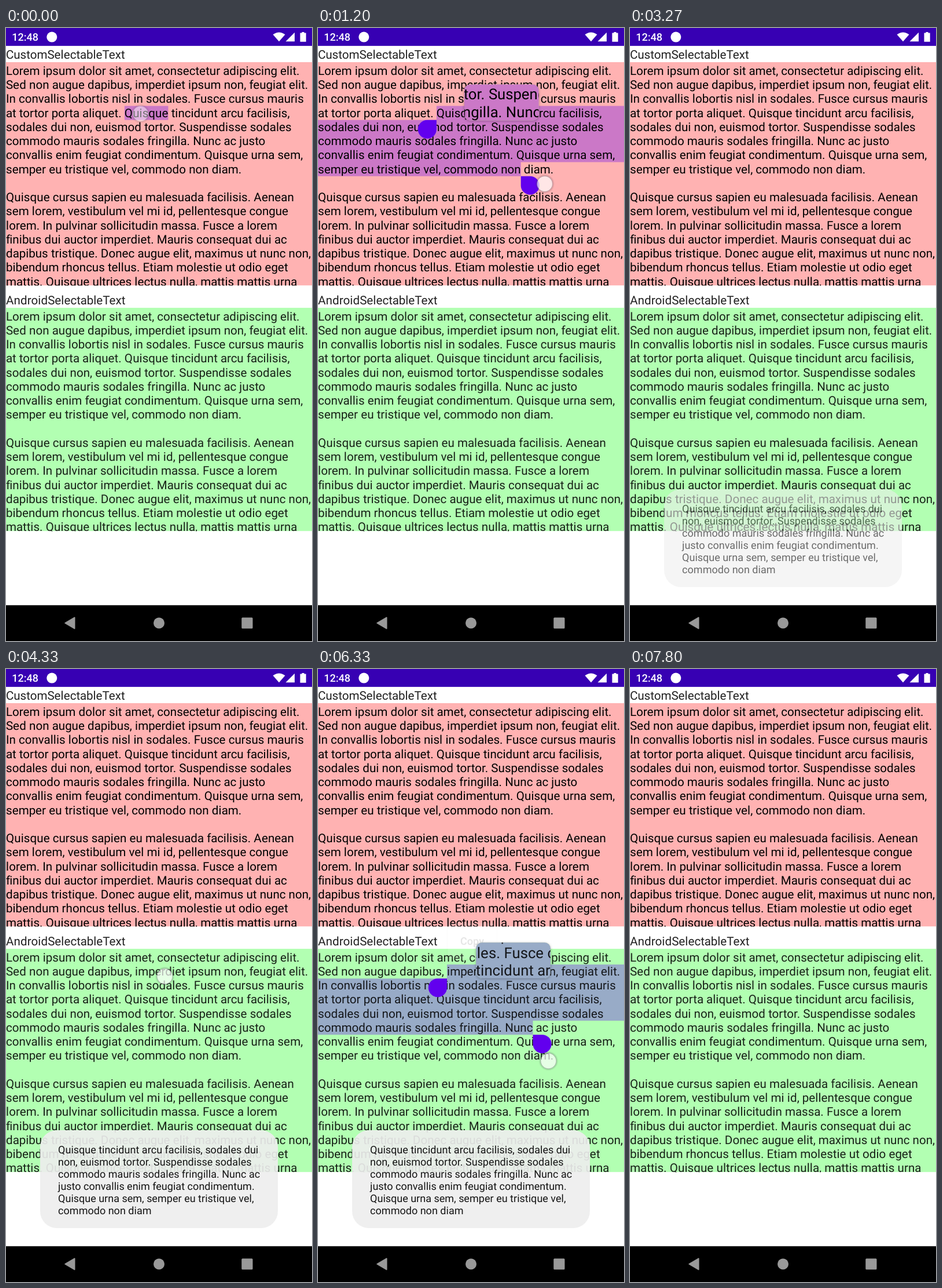
Write an HTML page that moves like this. It is 529 px wide and 1058 px high and loops after 8.67 s.

```html
<!DOCTYPE html>
<html lang="en">
<head>
<meta charset="utf-8">
<title>Selectable text</title>
<style>
  html, body { margin: 0; width: 100%; height: 100%; overflow: hidden; background: #fff; }
  svg { display: block; width: 100vw; height: 100vh; font: 20.572px Roboto, sans-serif; }
  text { white-space: pre; text-rendering: geometricPrecision; }
  .small { font-size: 18px; }
  .medium { font-weight: 500; }
  .middle { text-anchor: middle; }
  .lift { filter: drop-shadow(0 1px 2px rgba(0, 0, 0, .28)); }
</style>
</head>
<body>
<svg id="stage" viewBox="0 0 529 1058">
  <defs>
    <clipPath id="lens"><rect x="-64.3" y="-30.9" width="128.6" height="61.8" rx="10"/></clipPath>
    <path id="drop" d="M0 0V16.07A16.07 16.07 0 1 1 -16.07 0Z" fill="#6200ee"/>
  </defs>

  <g id="page"><rect width="529" height="1058" fill="#fff"/></g>

  <rect width="529" height="30.86" fill="#3700b3"/>
  <g fill="#fff">
    <text class="small medium" x="10.3" y="22.4">12:48</text>
    <circle cx="79.3" cy="15.6" r="9"/>
    <path d="M472 23.3L461.5 11.2Q472 3.6 482.5 11.2Z"/>
    <path d="M483.5 23.3H499V7.8Z"/>
    <path d="M511.5 7h4v1.6h3.2v15.2h-10.2v-15.2h3z"/>
  </g>
  <rect y="996.25" width="529" height="61.75" fill="#000"/>
  <g fill="#999">
    <path d="M102.3 1027L118.5 1017.6V1036.4Z" stroke="#999" stroke-width="2" stroke-linejoin="round"/>
    <circle cx="264.5" cy="1027" r="9.5"/>
    <rect x="407.3" y="1017.4" width="19.2" height="19.2" rx="1.5"/>
  </g>

  <use id="startHandle" href="#drop"/>
  <use id="endHandle" href="#drop"/>

  <g id="bar" class="lift">
    <rect height="62" rx="8" y="-31" fill="#fff"/>
    <text class="small medium middle" x="0" y="6.8"></text>
  </g>

  <g id="magnifier" class="lift">
    <g clip-path="url(#lens)"><use id="zoomed" href="#page"/></g>
    <rect x="-64.3" y="-30.9" width="128.6" height="61.8" rx="10" fill="none" stroke="#000" stroke-opacity=".08"/>
  </g>

  <g id="toast">
    <rect x="59" y="796" width="411" height="169" rx="29" fill="#eee" fill-opacity=".91"/>
    <g id="toastText" class="small" fill="#141414"></g>
  </g>

  <g id="dot">
    <circle r="15" fill="none" stroke="#403848" stroke-opacity=".12" stroke-width="2.5"/>
    <circle r="13.5" fill="#fff" fill-opacity=".68" stroke="#605868" stroke-opacity=".32" stroke-width="1.4"/>
  </g>
</svg>

<script>
const LOOP = 8670, STEP = 1000 / 15, WIDTH = 529;
// The phone lays out on a 1440 pixel wide screen; sizes in device pixels times PX.
const PX = WIDTH / 1440, BODY = 56, SMALL = 49;
const LINE = 66 * PX, ASCENT = 52 * PX, PANEL_TOP = 160 * PX, PANEL_HEIGHT = 1050 * PX;
const FIRST_TOP = 168 * PX, LABEL_BASE = 144 * PX;
const ZOOM = 1.25, SELECT_LAG = 60, LENS_LAG = 190, FADE = 220;

const LINES = `Lorem ipsum dolor sit amet, consectetur adipiscing elit.
Sed non augue dapibus, imperdiet ipsum non, feugiat elit.
In convallis lobortis nisl in sodales. Fusce cursus mauris
at tortor porta aliquet. Quisque tincidunt arcu facilisis,
sodales dui non, euismod tortor. Suspendisse sodales
commodo mauris sodales fringilla. Nunc ac justo
convallis enim feugiat condimentum. Quisque urna sem,
semper eu tristique vel, commodo non diam.

Quisque cursus sapien eu malesuada facilisis. Aenean
sem lorem, vestibulum vel mi id, pellentesque congue
lorem. In pulvinar sollicitudin massa. Fusce a lorem
finibus dui auctor imperdiet. Mauris consequat dui ac
dapibus tristique. Donec augue elit, maximus ut nunc non,
bibendum rhoncus tellus. Etiam molestie ut odio eget
mattis. Quisque ultrices lectus nulla, mattis mattis urna`.split('\n');

const TOAST = `Quisque tincidunt arcu facilisis, sodales dui
non, euismod tortor. Suspendisse sodales
commodo mauris sodales fringilla. Nunc ac
justo convallis enim feugiat condimentum.
Quisque urna sem, semper eu tristique vel,
commodo non diam`.split('\n');

const $ = id => document.getElementById(id);

function add(parent, tag, attrs = {}, text = '') {
  const node = document.createElementNS('http://www.w3.org/2000/svg', tag);
  for (const key in attrs) node.setAttribute(key, attrs[key]);
  node.textContent = text;
  return parent.appendChild(node);
}

const pen = document.createElement('canvas').getContext('2d');
pen.textRendering = 'geometricPrecision';
const measure = s => pen.measureText(s).width;

// Pen positions with glyph advances rounded to whole device pixels, plus kerning.
function penPositions(text, size) {
  pen.font = `${size}px Roboto, sans-serif`;
  let x = 0;
  return [...text].map((c, i) => {
    const last = text[i - 1];
    if (last) x += Math.round(measure(last)) + measure(last + c) - measure(last) - measure(c);
    return x * PX;
  });
}

function addText(parent, text, x, y, size, attrs) {
  const xs = penPositions(text, size).map(p => (x + p).toFixed(3)).join(' ');
  return add(parent, 'text', { x: xs, y, ...attrs }, text);
}

function addPanel(y, back, ink) {
  const panel = add($('page'), 'g', { transform: `translate(0 ${y})` });
  addText(panel, ink.label, 0, LABEL_BASE, BODY, { 'fill-opacity': .87 });
  const box = add(panel, 'svg', {
    y: PANEL_TOP, width: WIDTH, height: PANEL_HEIGHT, viewBox: `0 ${PANEL_TOP} ${WIDTH} ${PANEL_HEIGHT}`
  });
  add(box, 'rect', { y: PANEL_TOP, width: WIDTH, height: PANEL_HEIGHT, fill: back });
  const selection = add(box, 'path', { fill: '#6200ee', 'fill-opacity': .33 });
  const rows = LINES.map((line, i) =>
    addText(box, line, 0, FIRST_TOP + ASCENT + i * LINE, BODY, { 'fill-opacity': ink.alpha }));
  return { y, selection, rows };
}

const panels = [
  addPanel(0, '#ffb2b2', { label: 'CustomSelectableText', alpha: 1 }),
  addPanel(1154 * PX, '#b2ffb2', { label: 'AndroidSelectableText', alpha: .87 })
];
TOAST.forEach((line, i) => addText($('toastText'), line, 90, 836.2 + i * 57 * PX, SMALL));

// Left and right edge of every word, per line.
const words = panels[0].rows.map((row, i) => [...LINES[i].matchAll(/\w+/g)].map(m => ({
  word: m[0],
  left: row.getStartPositionOfChar(m.index).x,
  right: row.getEndPositionOfChar(m.index + m[0].length - 1).x
})));

// Finger paths hold [time, x, y].
const sessions = [
  { panel: panels[0], line: 3, word: 'Quisque', from: 0, handles: 395, to: 3125,
    lens: [[925, 1860]],
    path: [[930, 292, 176], [1130, 384, 267], [1200, 392, 269], [1670, 446, 273]] },
  { panel: panels[1], line: 1, word: 'imperdiet', from: 4795, handles: 4860, to: 7660,
    lens: [[4795, 5328], [6065, 6595]],
    path: [[6070, 325, 552], [6140, 352, 586], [6270, 375, 649], [6330, 398, 676],
           [6500, 418, 700], [6600, 425, 702]] }
];

for (const s of sessions) {
  s.first = words[s.line].find(w => w.word === s.word);
  s.top = FIRST_TOP + s.panel.y;
  s.dx = s.path[0][1] - s.first.right;
  s.dy = s.path[0][2] - (s.top + (s.line + .5) * LINE);
}

const touches = [
  { down: 0, up: -70, x: 232.5, y: 148 },
  { down: 865, up: 1840, path: sessions[0].path },
  { down: 2795, up: 2910, x: 305, y: 96 },
  { down: 4325, up: 5270, x: 274.5, y: 530.5 },
  { down: 5995, up: 6570, path: sessions[1].path },
  { down: 7460, up: 7570, x: 313, y: 472 }
];

// fade: in from, in to, out from, out to
const bars = [
  { label: 'Custom copy', width: 148, x: 242, y: 93.3, fade: [340, 600, 930, 1130] },
  { label: 'Custom copy', width: 148, x: 303, y: 93.3, fade: [1970, 2200, 2960, 3140] },
  { label: 'Copy', width: 84, x: 266.5, y: 469.5, fade: [5370, 5600, 6130, 6355] },
  { label: 'Copy', width: 84, x: 312.5, y: 469.5, fade: [6700, 6930, 7570, 7740] }
];

const ramp = (t, a, b) => Math.min(1, Math.max(0, (t - a) / (b - a)));
const pulse = (t, [a, b, c, d]) => ramp(t, a, b) * (1 - ramp(t, c, d));
const easeOut = p => 1 - (1 - p) ** 2.1;

function along(path, t) {
  const next = path.findIndex(key => key[0] > t);
  if (next === 0) return path[0].slice(1);
  if (next < 0) return path[path.length - 1].slice(1);
  const a = path[next - 1], b = path[next], p = ramp(t, a[0], b[0]);
  return [a[1] + (b[1] - a[1]) * p, a[2] + (b[2] - a[2]) * p];
}

function textPoint(s, t) {
  const [x, y] = along(s.path, t);
  return [x - s.dx, y - s.dy];
}

function selectionEnd(s, t) {
  const [x, y] = textPoint(s, t - SELECT_LAG);
  const line = Math.floor((y - s.top) / LINE);
  const passed = words[line].filter(w => (w.left + w.right) / 2 <= x);
  return { line, x: passed.length ? passed[passed.length - 1].right : 0 };
}

function selectionPath(s, end) {
  const y = i => FIRST_TOP + i * LINE;
  const rect = (x1, x2, from, to) => `M${x1} ${y(from)}H${x2}V${y(to)}H${x1}Z`;
  if (end.line === s.line) return rect(s.first.left, end.x, s.line, s.line + 1);
  return rect(s.first.left, WIDTH, s.line, s.line + 1)
    + rect(0, WIDTH, s.line + 1, end.line)
    + rect(0, end.x, end.line, end.line + 1);
}

const show = (node, opacity) => {
  node.style.display = opacity > 0 ? '' : 'none';
  node.style.opacity = opacity;
};
const place = (node, transform) => node.setAttribute('transform', transform);

function drawSelection(t) {
  let handles = 0, lens = 0;
  for (const s of sessions) {
    const active = t >= s.from && t < s.to;
    show(s.panel.selection, active ? 1 : 0);
    if (!active) continue;
    const end = selectionEnd(s, t);
    s.panel.selection.setAttribute('d', selectionPath(s, end));
    handles = t >= s.handles ? 1 : 0;
    place($('startHandle'), `translate(${s.first.left} ${s.top + (s.line + 1) * LINE})`);
    place($('endHandle'), `translate(${end.x} ${s.top + (end.line + 1) * LINE}) scale(-1 1)`);

    lens = s.lens.some(([a, b]) => t >= a && t < b) ? 1 : 0;
    let [x, y] = textPoint(s, t - LENS_LAG);
    if (t < s.path[0][0]) x = 274.5;
    place($('magnifier'), `translate(${x} ${y - 54.5})`);
    place($('zoomed'), `scale(${ZOOM}) translate(${-x} ${1 - y})`);
  }
  show($('startHandle'), handles);
  show($('endHandle'), handles);
  show($('magnifier'), lens);
}

function drawBar(t) {
  const bar = bars.find(b => pulse(t, b.fade) > 0);
  show($('bar'), bar ? pulse(t, bar.fade) : 0);
  if (!bar) return;
  const [rect, label] = $('bar').children;
  rect.setAttribute('x', -bar.width / 2);
  rect.setAttribute('width', bar.width);
  label.textContent = bar.label;
  place($('bar'), `translate(${bar.x} ${bar.y})`);
}

function drawTouch(t) {
  const touch = touches.find(d => t >= d.down && t < d.up + FADE);
  show($('dot'), touch ? 1 - ramp(t, touch.up, touch.up + FADE) : 0);
  if (!touch) return;
  const [x, y] = touch.path ? along(touch.path, t) : [touch.x, touch.y];
  place($('dot'), `translate(${x} ${y})`);
}

function draw(time) {
  const t = Math.floor((time % LOOP + 5) / STEP) * STEP;
  drawSelection(t);
  drawBar(t);
  drawTouch(t);
  show($('toast'), easeOut(ramp(t, 3100, 3540)) * (1 - ramp(t, 6620, 6930)));
}

const began = performance.now();
function tick() {
  draw(performance.now() - began);
  requestAnimationFrame(tick);
}
tick();
</script>
</body>
</html>
```
